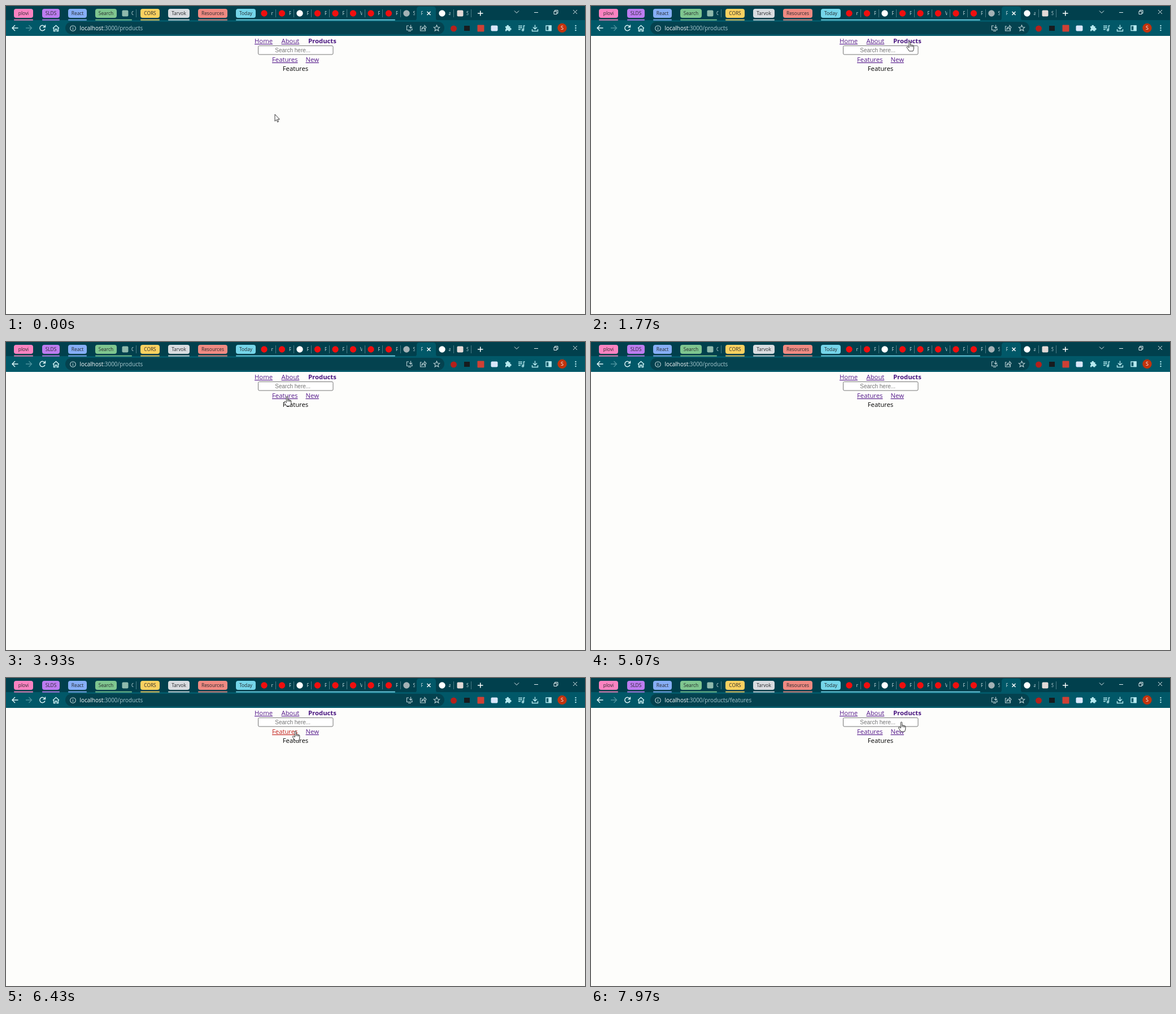
Recreate the animation shown at these times as an HTML page. Size 1025 px wide and 546 px high, loop 8 s.

```html
<!DOCTYPE html>
<html lang="en">
<head>
<meta charset="utf-8">
<title>Router demo</title>
<style>
  html, body { margin: 0; width: 100%; height: 100%; overflow: hidden; background: #fdfdfb; }
  svg.stage { display: block; width: 100vw; height: 100vh; }
  text { font: 11.3px "Open Sans", "Noto Sans", sans-serif; white-space: pre; }
  .chip { font-size: 8.4px; fill: #25282c; text-anchor: middle; }
  .title { font-size: 8.4px; fill: #d5e6e9; }
  .url { font-size: 9.95px; fill: #a9c9cf; }
  .url .host { fill: #fff; }
  .form { font: 10px "Liberation Sans", Arial, sans-serif; }
  .link { fill: #551a8b; text-decoration: underline; }
  .link.current { font-weight: 700; text-decoration: none; fill: #47137f; }
  .link.pressed { fill: #c3221c; }
  .icon { fill: none; stroke: #b5e9ef; stroke-width: 1.4; }
  .window { fill: none; stroke: #e4eff1; stroke-width: 1; }
</style>
</head>
<body>
<svg class="stage" viewBox="0 0 1025 546" preserveAspectRatio="none">
  <rect width="1025" height="546" fill="#fdfdfb"/>
  <rect width="1025" height="26" fill="#01404d"/>
  <rect y="25" width="1025" height="28" fill="#015868"/>
  <path d="M722 26q5 0 5-5V6q0-5 5-5H756q5 0 5 5V21q0 5 5 5z" fill="#015868"/>
  <g id="tabs"></g>

  <g class="window">
    <path d="M900 8.500l4 4 4-4M935 11.500h7M970 9.500h5v5h-5zM971.500 9.500v-2h5.500v5.500h-2M1004 7l7 7M1011 7l-7 7"/>
    <path d="M745.500 10l6 6M751.500 10l-6 6M835 13h9.500M839.750 8.500v9" stroke="#fff" stroke-width="1.5"/>
  </g>

  <rect id="pill" x="105" y="28" width="671" height="22" rx="11" fill="#04424f"/>
  <g class="icon">
    <path d="M21.500 39h-10M16 34l-5 5 5 5" stroke="#e5fafc"/>
    <path d="M35 39h10M40.500 34l5 5-5 5" stroke="#4e929d"/>
    <path d="M68.500 36.500A4.700 4.700 0 1 0 69 40.500M69.500 33.500v4h-4" stroke="#e5fafc"/>
    <path d="M83 39.500l5.500-5 5.500 5M84.500 39v5.500h2.500v-3.500h3v3.500h2.500v-5.500" stroke="#d0f3f6"/>
    <g stroke="#b9cfd3" stroke-width="1.1">
      <circle cx="118.500" cy="39.500" r="4.800"/><path d="M118.500 38.800v3.500M118.500 36.500v1.200"/>
      <path d="M713 35h-3.500v7.500h9.500v-3M712 44.500h5M716.500 33.500v5.500M714 37l2.500 2.500 2.500-2.500"/>
      <path d="M736 36h-2.500v8h9v-3M736 41.500q0-4.500 5-4.500v-2.500l3 3.500-3 3.500v-2.500q-3.500 0-5 2.500z"/>
      <path d="M762.500 34l1.500 3.500 3.700.3-2.800 2.500.9 3.700-3.300-2-3.300 2 .9-3.700-2.800-2.500 3.700-.3z"/>
    </g>
    <path d="M907 35.500h7M907 38.500h7M907 41.500h4M916.500 42.500v-7.500h2"/><circle cx="915" cy="42.500" r="1.500"/>
    <path d="M936.500 33.500v7M933 37.500l3.500 3.500 3.500-3.500M931.500 41v3.500h10v-3.500"/>
    <path d="M956 35h9v8.500h-9z"/><path d="M961 35h4v8.500h-4z" fill="#b5e9ef"/>
  </g>
  <path d="M884 36h2.500a1.800 1.800 0 1 1 3.500 0h2.500v3a1.800 1.800 0 1 1 0 3.500v2h-3a1.800 1.800 0 0 0-3.500 0h-2v-3a1.700 1.700 0 0 0 0-3.200z" fill="#b5e9ef"/>
  <circle cx="792.500" cy="40" r="5.500" fill="#b5201b"/>
  <rect x="811" y="35" width="10" height="9" fill="#171b1e"/>
  <rect x="834.500" y="33.500" width="12" height="12" rx="1" fill="#cf4035"/>
  <rect x="858.500" y="34.500" width="12" height="10" rx="2" fill="#d9e7fb"/>
  <circle cx="984.500" cy="39" r="8.200" fill="#c2330d"/>
  <text class="title" x="984.500" y="42.300" text-anchor="middle" style="fill:#fff;font-size:9px">S</text>
  <g fill="#b5e9ef"><circle cx="1008.500" cy="35" r="1.200"/><circle cx="1008.500" cy="39" r="1.200"/><circle cx="1008.500" cy="43" r="1.200"/></g>
  <text class="url" x="130.500" y="43"><tspan class="host">localhost</tspan><tspan id="path"></tspan></text>

  <text class="link" id="home" y="66">Home</text>
  <text class="link" id="about" y="66">About</text>
  <text class="link" id="products" y="66">Products</text>

  <g id="homePage">
    <text x="482" y="94">Home page</text>
    <rect x="479.500" y="110.500" width="66" height="15" rx="2" fill="#efefef" stroke="#767676"/>
    <text class="form" x="512.500" y="121.600" text-anchor="middle">Place Order</text>
  </g>
  <g id="aboutPage"><text x="512.500" y="94" text-anchor="middle">About page</text></g>
  <g id="productsPage">
    <rect x="446.500" y="70.500" width="132.500" height="15.500" rx="2" fill="#fff" stroke="#767676"/>
    <text class="form" x="476.300" y="82" fill="#757575">Search here...</text>
    <text class="link" id="features" x="471" y="99">Features</text>
    <text class="link" id="new" x="530.500" y="99">New</text>
    <text id="detail" x="512.500" y="115" text-anchor="middle"></text>
  </g>

  <g id="cursor" stroke-linejoin="round" fill="#fff" stroke="#222" stroke-width=".9">
    <path id="arrow" d="M0 0V12.200L2.800 9.600 4.700 13.800 6.500 13 4.700 8.900H8.400z"/>
    <path id="hand" d="M-1.200 10V1.200Q-1.200 0 0 0T1.200 1.200V6Q2.200 5 3.400 6.300 4.500 5.600 5.400 6.900 7.300 6.500 7.300 8.500V12Q7 14.500 5.800 17H-.8Q-2.500 14-5 10.800-5.500 9-3.800 8.900-2.500 9.200-1.200 11ZM1.200 6v3M3.400 6.300v3M5.400 6.900v2.700"/>
  </g>
</svg>
<script>
const $ = id => document.getElementById(id);
const DURATION = 8000;

// Tab strip
const groups = [ // label, left, chip right, underline right, colour
  ['plovi', 14, 48, 48, '#fb83c1'], ['SLDS', 64, 95, 95, '#bd7cf0'],
  ['React', 110, 143, 143, '#86aef6'], ['Search', 158, 196, 223, '#7fc68f'],
  ['CORS', 238, 272, 272, '#fcd160'], ['Tarvok', 287, 325, 325, '#d9dce0'],
  ['Resources', 340, 392, 392, '#f08a82'], ['Today', 407, 442, 689, '#75d5e9']
];
const dot = (x, color) => `<circle cx="${x}" cy="13" r="5.700" fill="${color}"/>`;
const square = (x, color) => `<rect x="${x - 5.5}" y="7.500" width="11" height="11" rx="2" fill="${color}"/>`;
const clipped = (x, text) =>
  `<svg x="${x}" y="4" width="3.500" height="18"><text class="title" x="0" y="12">${text}</text></svg>`;

let tabs = groups.map(([label, left, right, end, color]) =>
  `<rect x="${left}" y="5" width="${right - left}" height="16" rx="4" fill="${color}"/>
   <rect x="${left}" y="23.800" width="${end - left}" height="1.700" rx=".8" fill="${color}"/>
   <text class="chip" x="${(left + right) / 2}" y="16">${label}</text>`).join('');
tabs += square(211, '#8fb9ac') + clipped(222, 'C');
[...'nPPPPVPP'].forEach((letter, i) => {
  const x = 457 + i * 31.5;
  tabs += dot(x, i === 2 ? '#fff' : '#f00f0f') + clipped(x + 12.5, letter);
});
tabs += dot(709, '#a4b1b5') + clipped(720.5, 'S') + clipped(734.5, 'P')
  + dot(772, '#fff') + clipped(783.5, 'a') + square(804, '#e3d9d6') + clipped(815, 'S');
for (const x of [230, ...Array.from({ length: 8 }, (_, i) => 477 + i * 31.5), 792, 823])
  tabs += `<path d="M${Math.round(x) + .5} 6v14" stroke="#4a7d87"/>`;
$('tabs').innerHTML = tabs;

// Route changes: time, path
const routes = [
  [0, '/products'], [1000, '/about'], [1600, '/products'], [2350, ''],
  [2830, '/about'], [3085, '/products'], [6570, '/products/features'],
  [7130, '/products/new'], [7520, '/products/features']
];
// Held mouse button: from, to, link
const presses = [
  [890, 1000, 'about'], [1500, 1600, 'products'], [2250, 2350, 'home'],
  [2730, 2830, 'about'], [4620, 4770, 'products'], [6425, 6570, 'features'],
  [7040, 7130, 'new'], [7430, 7520, 'features']
];
// Pointer path: time, x, y, shape from then on
const pointer = [
  [0, 476, 192, 'arrow'], [30, 476, 192, 'arrow'], [620, 499, 70, 'hand'], [730, 500.5, 63, 'hand'],
  [1100, 500.5, 63, 'hand'], [1400, 565, 63, 'hand'], [1750, 565, 63, 'hand'],
  [2150, 458, 63, 'hand'], [2370, 458, 63, 'hand'], [2560, 521, 61.5, 'hand'],
  [2880, 521, 61.5, 'hand'], [3070, 565, 63, 'hand'], [3300, 565, 63, 'arrow'],
  [3630, 500, 92, 'hand'], [3770, 500, 92, 'hand'], [3920, 497.5, 96.5, 'hand'],
  [4170, 497.5, 96.5, 'arrow'], [4400, 557, 66, 'hand'], [4770, 557, 66, 'arrow'],
  [5040, 560, -25, 'arrow'], [5560, 560, -25, 'arrow'], [5700, 545, 39, 'arrow'],
  [6030, 512.5, 94, 'hand'], [6650, 512.5, 94, 'hand'], [6950, 541, 95, 'hand'],
  [7190, 541, 95, 'hand'], [7390, 499, 95, 'hand'], [7600, 499, 95, 'hand'],
  [7960, 549.5, 78, 'hand'], [DURATION, 549.5, 78, 'hand']
];
const navLeft = { home: [441, 490, 538], about: [440.5, 487.5, 538], products: [440, 487.5, 535] };
const nav = ['home', 'about', 'products'];
const show = (id, visible) => $(id).style.display = visible ? '' : 'none';

function movePointer(t) {
  const next = Math.max(1, pointer.findIndex(key => key[0] > t));
  const [t0, x0, y0, shape] = pointer[next - 1], [t1, x1, y1] = pointer[next];
  const u = (t - t0) / (t1 - t0), ease = u * u * (3 - 2 * u);
  $('cursor').setAttribute('transform', `translate(${x0 + (x1 - x0) * ease} ${y0 + (y1 - y0) * ease})`);
  show('arrow', shape === 'arrow');
  show('hand', shape === 'hand');
}

function render(t) {
  const path = routes.findLast(route => route[0] <= t)[1];
  const page = path.split('/')[1] || 'home';
  const pressed = presses.find(([from, to]) => t >= from && t < to)?.[2];

  $('path').textContent = ':3000' + path;
  nav.forEach((id, i) => {
    $(id).setAttribute('x', navLeft[page][i]);
    $(id).classList.toggle('current', id === page);
    show(id + 'Page', id === page);
  });
  for (const id of [...nav, 'features', 'new']) $(id).classList.toggle('pressed', id === pressed);
  $('detail').textContent = path.endsWith('/new') ? 'New' : 'Features';
  $('pill').setAttribute('fill', t > 5660 && t < 5790 ? '#0a4d5a' : '#04424f');
  movePointer(t);
}

const start = performance.now();
function frame() {
  render((performance.now() - start) % DURATION);
  requestAnimationFrame(frame);
}
frame();
</script>
</body>
</html>
```
